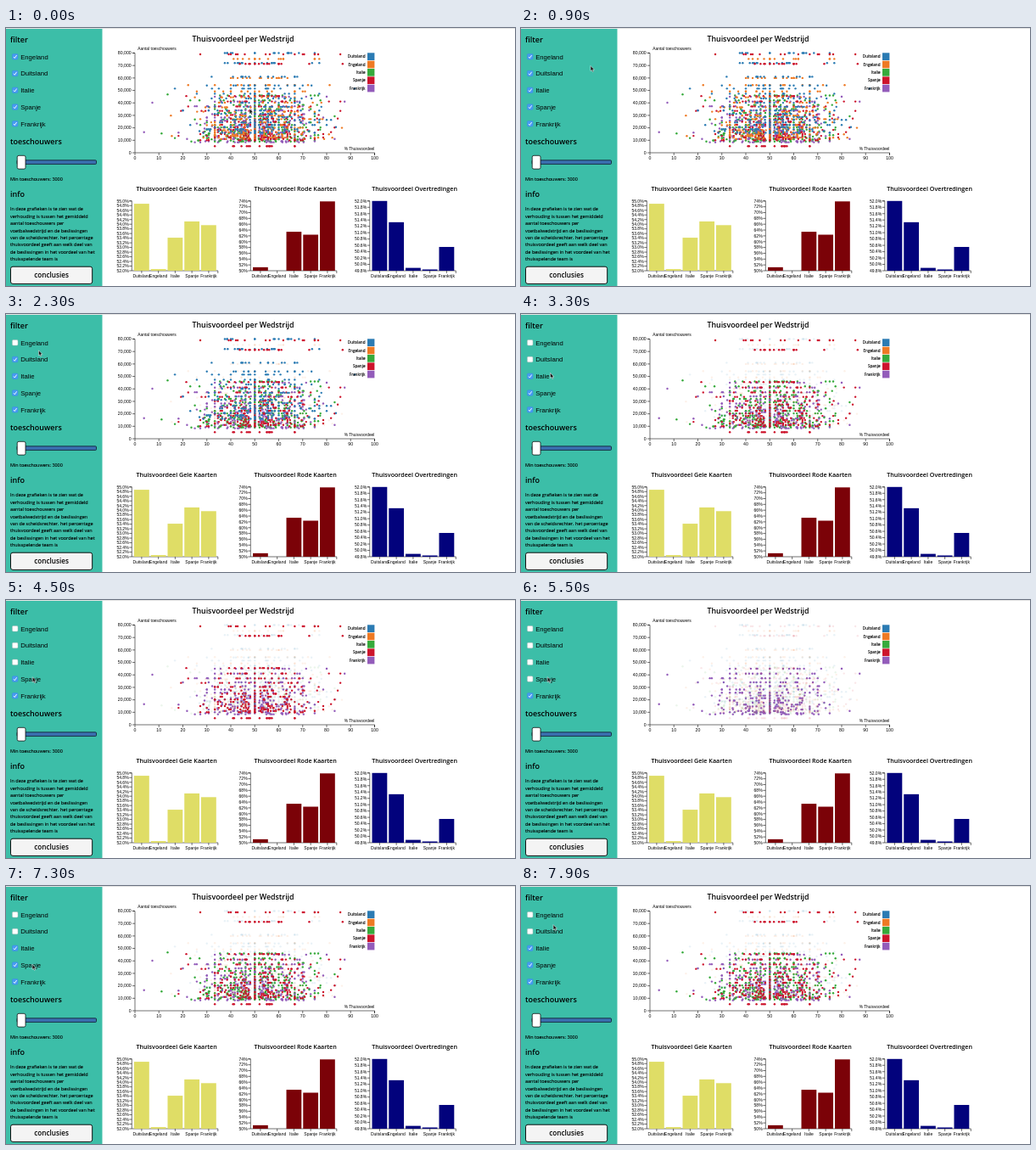
An HTML page for the animation above (8000 ms loop, 600 by 304 pixels).

```html
<!DOCTYPE html>
<html lang="nl">
<head>
<meta charset="utf-8">
<title>Thuisvoordeel</title>
<style>
  html, body { margin: 0; width: 100%; height: 100%; overflow: hidden; background: #fff; }
  svg { display: block; width: 100vw; height: 100vh; }
  text { font: 5px "Liberation Sans", Arial, sans-serif; fill: #000; }
  .ui { font-family: "Open Sans", "Noto Sans", sans-serif; stroke: #000; stroke-width: .12; }
  .head { font-weight: 600; stroke: none; }
  .axis { fill: none; stroke: #111; stroke-width: .6; }
</style>
</head>
<body>
<svg id="stage" viewBox="0 0 600 304"></svg>
<script>
const LOOP = 8000;
const stage = document.getElementById('stage');

function add(tag, attrs, parent = stage) {
  const el = document.createElementNS('http://www.w3.org/2000/svg', tag);
  for (const key in attrs) el.setAttribute(key, attrs[key]);
  parent.appendChild(el);
  return el;
}
const rect = (x, y, width, height, fill, more) => add('rect', { x, y, width, height, fill, ...more });
const axis = d => add('path', { d, class: 'axis' });

function label(str, x, y, { size = 5, anchor = 'start', cls = '' } = {}) {
  const el = add('text', { x, y, class: cls, 'text-anchor': anchor });
  el.style.fontSize = size + 'px';
  el.textContent = str;
}

function seeded(seed) {
  return () => {
    seed = (seed + 0x6D2B79F5) | 0;
    let t = Math.imul(seed ^ (seed >>> 15), 1 | seed);
    t = (t + Math.imul(t ^ (t >>> 7), 61 | t)) ^ t;
    return ((t ^ (t >>> 14)) >>> 0) / 4294967296;
  };
}

// Attendance in thousands: a few exceptional clubs, the rest falls off from high to low
const leagues = [
  { name: 'Duitsland', color: '#2b7bb3', special: [80, 72, 61, 54], high: 51.5, low: 16 },
  { name: 'Engeland', color: '#ee7a24', special: [75.3], high: 60, low: 11 },
  { name: 'Italie', color: '#36aa3b', special: [], high: 46, low: 9 },
  { name: 'Spanje', color: '#cd142c', special: [79, 71.3, 5.3], high: 45.5, low: 10 },
  { name: 'Frankrijk', color: '#935cba', special: [], high: 45, low: 8.4 }
];
const CLUBS = 19;
const league = name => leagues.find(l => l.name === name);

const filters = ['Engeland', 'Duitsland', 'Italie', 'Spanje', 'Frankrijk'];
const filterY = i => 33.9 + i * 19.75;
const clicks = [
  [1700, 'Engeland'], [2800, 'Duitsland'], [3650, 'Italie'], [4800, 'Spanje'],
  [6200, 'Italie'], [7150, 'Spanje'], [8280, 'Engeland']
];

function drawSidebar() {
  rect(0, 0, 600, 1, '#e3e3e3');
  rect(0, 1, 113.5, 303, '#3cbea8');
  const head = { size: 9, cls: 'ui head' };
  label('filter', 5, 17.3, head);
  filters.forEach((name, i) => {
    const y = filterY(i);
    label(name, 17.2, y + 2.6, { size: 7.7 });
    const box = rect(7.4, y - 3.4, 6.6, 6.6, '#fff', { rx: 1.3, 'stroke-width': .5 });
    const tick = add('path', {
      d: `M9 ${y + .1}l1.3 1.5l2.3-3.5`, fill: 'none', stroke: '#fff', 'stroke-width': .9
    });
    Object.assign(league(name), { box, tick });
  });

  label('toeschouwers', 5, 136.6, head);
  rect(13, 155.8, 93.5, 4.6, '#3a70b0', { rx: 1, stroke: '#0e1b2a', 'stroke-width': .8 });
  rect(13.2, 150.3, 9.8, 15.8, '#fff', { rx: 1.8, stroke: '#111', 'stroke-width': .8 });
  label('Min toeschouwers: 3000', 5, 180, { size: 5.45, cls: 'ui' });

  label('info', 5, 198.7, head);
  [
    'In deze grafieken is te zien wat de',
    'verhouding is tussen het gemiddeld',
    'aantal toeschouwers per',
    'voetbalwedstrijd en de beslissingen',
    'van de scheidsrechter. het percentage',
    'thuisvoordeel geeft aan welk deel van',
    'de beslissingen in het voordeel van het',
    'thuisspelende team is'
  ].forEach((line, i) => label(line, 5, 215.2 + i * 8.45, { size: 5.5, cls: 'ui' }));

  rect(5.5, 281.2, 96.2, 20.2, '#f4f4f4', { rx: 2.5, stroke: '#111', 'stroke-width': 1 });
  label('conclusies', 53.6, 294.3, { size: 8.2, anchor: 'middle', cls: 'ui head' });
}

function drawScatter() {
  const left = 152, right = 434.5, top = 29.5, bottom = 147;
  const px = v => left + v / 100 * (right - left);
  const py = v => bottom - v / 80 * (bottom - top);

  label('Thuisvoordeel per Wedstrijd', 279.5, 16.3, { size: 8.85, anchor: 'middle', cls: 'ui head' });
  axis(`M${left - 3} ${top}H${left}V${bottom}H${right}v3`);
  for (let v = 0; v <= 80; v += 10) {
    axis(`M${left - 3} ${py(v)}h3`);
    label(v ? v + ',000' : '0', left - 4.3, py(v) + 1.8, { anchor: 'end', size: 5.2 });
  }
  for (let v = 0; v <= 100; v += 10) {
    axis(`M${px(v)} ${bottom}v3`);
    label(v, px(v), bottom + 8.4, { anchor: 'middle', size: 5.2 });
  }
  label('Aantal toeschouwers', 155.3, 25.8, { size: 4.9 });
  label('% Thuisvoordeel', 434.3, 144, { anchor: 'end', size: 4.8 });

  const random = seeded(29);
  const spread = () => (random() + random() + random() + random() - 2) * Math.sqrt(3);
  leagues.forEach(item => {
    const { special, high, low } = item, rest = CLUBS - special.length;
    item.crowds = [...special];
    for (let i = 0; i < rest; i++) item.crowds.push(high * (low / high) ** (i / (rest - 1)));
    item.groups = [];
  });
  // Clubs of all leagues alternate, so that no colour covers the others
  for (let club = 0; club < CLUBS; club++) {
    for (const item of leagues) {
      const crowd = item.crowds[club], mean = crowd > 65 ? .57 : .51;
      const group = add('g', { fill: item.color });
      item.groups.push(group);
      for (let match = 0; match < 16; match++) {
        // A share of a whole number of decisions gathers at simple fractions
        const decisions = 8 + Math.floor(random() * 24);
        const forHome = Math.round(decisions * (mean + .125 * spread()));
        add('circle', { cx: px(100 * forHome / decisions), cy: py(crowd), r: 1.2 }, group);
      }
    }
  }
  const outlier = (name, x, y) => add('circle', { cx: x, cy: y, r: 1.2 }, league(name).groups[0]);
  outlier('Frankrijk', 172.5, 88);
  outlier('Frankrijk', 162.7, 122.8);
  outlier('Italie', 190.5, 78.3);

  leagues.forEach((item, i) => {
    const y = 29.3 + i * 9.35;
    rect(426, y, 8.4, 8.7, item.color);
    label(item.name, 423.5, y + 5.9, { size: 4.65, anchor: 'end', cls: 'ui' });
  });
}

function drawBars({ title, left, color, high, low, step, digits, values }) {
  const top = 203.8, bottom = 286, pitch = 19.75;
  const py = v => bottom - (v - low) / (high - low) * (bottom - top);
  label(title, left + 52.8, 192.2, { size: 7.15, anchor: 'middle', cls: 'ui head' });
  axis(`M${left - 3} ${top}H${left}V${bottom}H${left + 101.5}v3`);
  const count = Math.round((high - low) / step);
  for (let i = 0; i <= count; i++) {
    const v = high - i * step;
    axis(`M${left - 3} ${py(v)}h3`);
    label(v.toFixed(digits) + '%', left - 3.7, py(v) + 1.8, { anchor: 'end' });
  }
  leagues.forEach((item, i) => {
    const x = left + 2.7 + i * pitch;
    rect(x, py(values[i]), 17.8, bottom - py(values[i]), color);
    axis(`M${x + 8.9} ${bottom}v3`);
    label(item.name, x + 8.9, 293.8, { anchor: 'middle' });
  });
}

drawSidebar();
drawScatter();
drawBars({ title: 'Thuisvoordeel Gele Kaarten', left: 148.3, color: '#dfdd66',
  high: 55, low: 52, step: .2, digits: 1, values: [54.88, 52.07, 53.42, 54.12, 53.96] });
drawBars({ title: 'Thuisvoordeel Rode Kaarten', left: 288.3, color: '#7b0208',
  high: 74, low: 50, step: 2, digits: 0, values: [51.2, 50, 63.4, 62.4, 73.85] });
drawBars({ title: 'Thuisvoordeel Overtredingen', left: 428.8, color: '#02027c',
  high: 52, low: 49.8, step: .2, digits: 1, values: [52, 51.33, 49.89, 49.84, 50.55] });

const pointer = add('path', {
  d: 'M0 0V6.2L1.4 5L2.4 7.2L3.5 6.7L2.5 4.6H4.4Z',
  fill: '#111', stroke: '#fff', 'stroke-width': .5
});

// The pointer travels for a while and rests on each stop shortly before its click
const TRAVEL = 600, REST = 200;
const stops = [
  { at: 950, x: 82, y: 44.5 },
  ...clicks.map(([at, name]) => {
    const i = filters.indexOf(name);
    return { at, x: 40 - 3 * i, y: filterY(i) - 1 };
  })
];

function pointerAt(t) {
  let x = 287, y = 95;
  for (const stop of stops) {
    const u = Math.min(1, Math.max(0, (t - stop.at + REST + TRAVEL) / TRAVEL));
    const ease = u * u * (3 - 2 * u);
    x += (stop.x - x) * ease;
    y += (stop.y - y) * ease;
  }
  return [x, y];
}

function render(t) {
  leagues.forEach(({ name, groups, box, tick }) => {
    const on = clicks.filter(([at, which]) => which === name && at <= t).length % 2 === 0;
    groups.forEach(group => group.setAttribute('fill-opacity', on ? 1 : .1));
    box.setAttribute('fill', on ? '#479bf2' : '#fff');
    box.setAttribute('stroke', on ? '#3d8be0' : '#a5b5b2');
    tick.setAttribute('visibility', on ? 'visible' : 'hidden');
  });
  pointer.setAttribute('transform', `translate(${pointerAt(t)})`);
}

const start = performance.now();
function loop() {
  render((performance.now() - start) % LOOP);
  requestAnimationFrame(loop);
}
loop();
</script>
</body>
</html>
```
